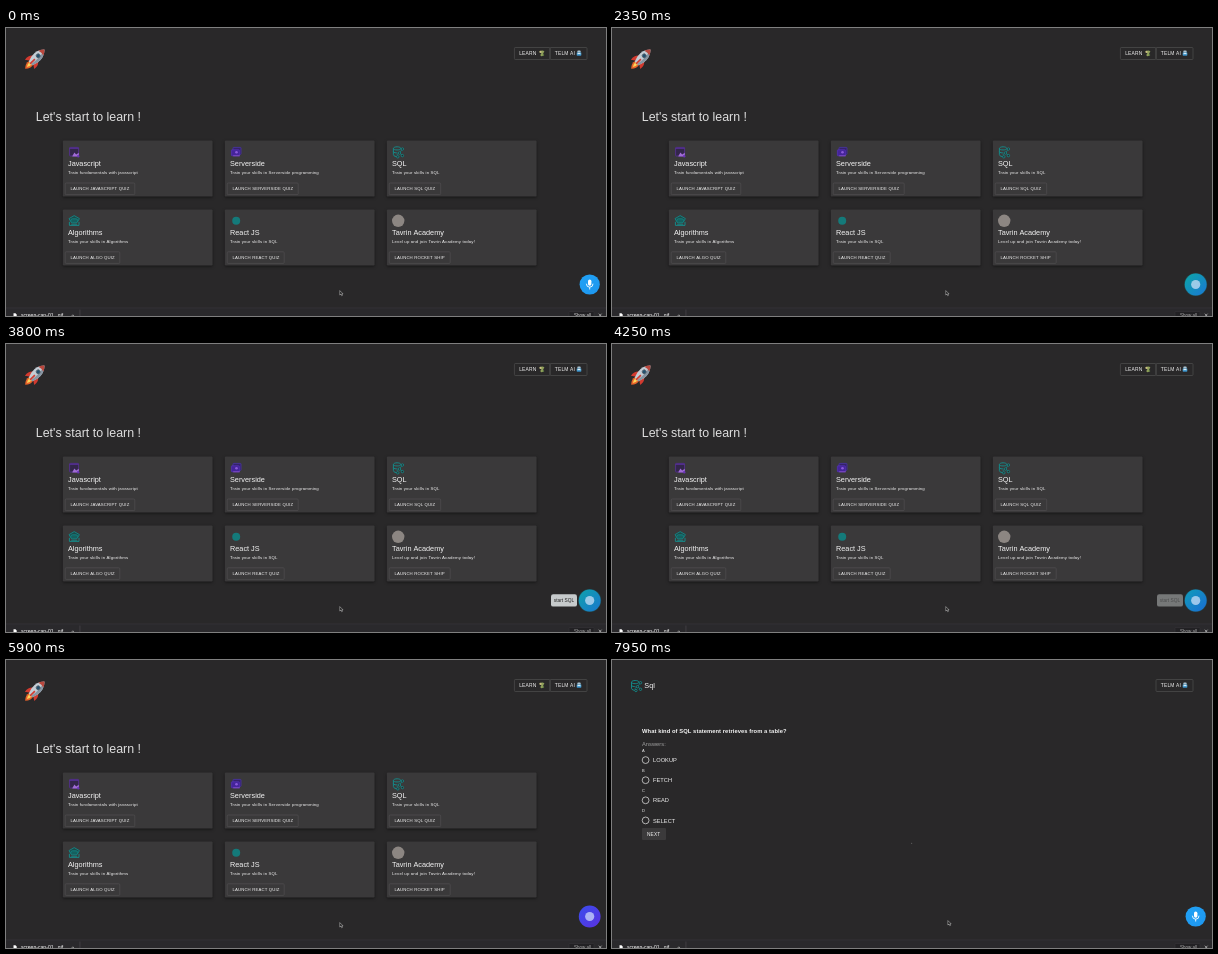
Animation, 600 px wide and 288 px high, one loop 8000 ms. Source, as an HTML page with a canvas:

```html
<!DOCTYPE html>
<html lang="en">
<head>
<meta charset="utf-8">
<title>Quiz dashboard</title>
<style>
html, body { margin: 0; width: 600px; height: 288px; overflow: hidden; background: #292829; }
canvas { display: block; width: 600px; height: 288px; }
</style>
</head>
<body>
<canvas id="stage"></canvas>
<script>
const W = 600, H = 288, LOOP = 8000;
const SANS = '"Liberation Sans", Arial, sans-serif';
const PURPLE = '#6a35b4', TEAL = '#12908f', INK = '#f4f4f4';
const canvas = document.getElementById('stage');
const ctx = canvas.getContext('2d');
const dpr = window.devicePixelRatio || 1;
canvas.width = W * dpr;
canvas.height = H * dpr;

const clamp = v => Math.max(0, Math.min(1, v));
const ramp = (t, a, b) => { const p = clamp((t - a) / (b - a)); return p * p * (3 - 2 * p); };
const mix = (a, b, p) => a + (b - a) * p;

function text(str, x, y, size, { color = INK, gap = 0, weight = 400, align = 'left' } = {}) {
  ctx.font = `${weight} ${size}px ${SANS}`;
  ctx.letterSpacing = gap + 'px';
  ctx.textAlign = align;
  ctx.fillStyle = color;
  ctx.fillText(str, x, y);
}

function box(x, y, w, h, r, fill, stroke, line = 0.6) {
  ctx.beginPath();
  ctx.roundRect(x, y, w, h, r);
  if (fill) { ctx.fillStyle = fill; ctx.fill(); }
  if (stroke) { ctx.strokeStyle = stroke; ctx.lineWidth = line; ctx.stroke(); }
}

function disc(x, y, r, fill, stroke, line = 0.7) {
  ctx.beginPath();
  ctx.arc(x, y, r, 0, Math.PI * 2);
  if (fill) { ctx.fillStyle = fill; ctx.fill(); }
  if (stroke) { ctx.strokeStyle = stroke; ctx.lineWidth = line; ctx.stroke(); }
}

function shape(d, fill, stroke, line = 0.7) {
  const p = new Path2D(d);
  if (fill) { ctx.fillStyle = fill; ctx.fill(p); }
  if (stroke) { ctx.strokeStyle = stroke; ctx.lineWidth = line; ctx.stroke(p); }
}

function at(x, y, draw, scale = 1, angle = 0) {
  ctx.save();
  ctx.translate(x, y);
  ctx.rotate(angle);
  ctx.scale(scale, scale);
  draw();
  ctx.restore();
}

// Icons, each drawn around its own centre
function codeIcon() {
  box(-4.6, -4.6, 9, 8.6, 0.6, '#33264a', '#59309a', 0.8);
  shape('M-4.6 -3.6H4.4', null, '#59309a', 0.9);
  shape('M-1.8 4L0.2 0.6L2 2.4L4.6 0.8V4.4H-1.8Z', '#a06bd6');
  disc(4, 4.2, 1.2, PURPLE);
}

function serverIcon() {
  box(-3.2, -4.6, 8, 7, 0.6, '#35226a', '#4a34a8', 0.8);
  box(-4.8, -2.2, 8, 6, 0.6, '#45249a', '#5433b4', 0.8);
  shape('M-3 3.8H3.6', null, '#8a4fd0', 0.9);
  disc(0.3, 0.3, 1.3, '#8a5ad8');
}

function sqlIcon() {
  shape('M-4.8 -3.4C-4.8 -5.8 2.6 -5.8 2.6 -3.4C2.6 -1.6 -4.8 -1.6 -4.8 -3.4V2.6C-4.8 4.2 -2 4.8 -0.6 4.6M-4.8 -0.4C-4.6 0.8 -2 1 -1 0.8', null, TEAL, 0.9);
  shape('M1.2 1L4 -2.6M1.2 1L4.2 3.2M1.2 1L-1.6 2.8', null, TEAL, 0.7);
  for (const [x, y] of [[1.2, 1], [4.2, -3], [4.2, 3.6], [-0.4, 4.8]]) disc(x, y, 1.2, '#292829', TEAL, 0.8);
}

function algoIcon() {
  shape('M-5.2 -2.2L0 -5.2L5.2 -2.2L3.6 0.6H-3.6Z', '#1c4a4a', TEAL, 0.8);
  box(-3.4, -2, 6.8, 4, 1.6, '#15605f', TEAL, 0.7);
  shape('M-4.8 1V4.6H4.8V1M-3 3.4H3', null, TEAL, 0.9);
}

function rocket() {
  shape('M-3 -0.6Q-8 2.6 -7 9.4L-2.2 6.2ZM3 -0.6Q8 2.6 7 9.4L2.2 6.2Z', '#d23a2f');
  shape('M-2.9 7.4Q-4.4 11.4 0 16Q4.4 11.4 2.9 7.4Z', '#e8632a');
  shape('M-1.5 7.4Q-2.2 10.6 0 13.4Q2.2 10.6 1.5 7.4Z', '#fbd75a');
  shape('M0 -13Q6.2 -7 4.6 2L2.8 7.8H-2.8L-4.6 2Q-6.2 -7 0 -13Z', '#c3ccd4');
  shape('M0 -13Q6.2 -7 4.6 2L2.8 7.8H0.8Q3.2 -3 0 -13Z', '#8795a2');
  shape('M0 -13Q2.6 -10.6 3.7 -7.6Q0 -9 -3.7 -7.6Q-2.6 -10.6 0 -13Z', '#b9473d');
  disc(0, -3.6, 2.1, '#24506e', '#56616b', 0.9);
  shape('M0 1.4V8.6', null, '#d23a2f', 1.7);
}

function lizard() {
  shape('M-2.6 -1.6Q0 -3.4 2.4 -2L1.2 0.4Q2.2 3 -0.6 3Q-2.6 2.4 -0.6 0Z', '#8fa05a');
  disc(-1.5, -1.3, 1.1, '#c9bd83');
  disc(1.4, 1.9, 0.8, '#5d7c45');
}

function robot() {
  box(-2.3, -1, 4.6, 3.6, 0.8, '#4d9fd0');
  box(-1.7, -2.8, 3.4, 2, 0.9, '#a9c3d2');
  shape('M-1.4 0.3H1.4', null, '#e8f3fa', 0.9);
  shape('M-1.8 2.3H1.8', null, '#2f6f9c', 0.8);
}

const cards = [
  ['Javascript', 'Train fundamentals with javascript', 'LAUNCH JAVASCRIPT QUIZ', 69.6, codeIcon],
  ['Serverside', 'Train your skills in Serverside programming', 'LAUNCH SERVERSIDE QUIZ', 71, serverIcon],
  ['SQL', 'Train your skills in SQL', 'LAUNCH SQL QUIZ', 51.5, sqlIcon],
  ['Algorithms', 'Train your skills in Algorithms', 'LAUNCH ALGO QUIZ', 54.6, algoIcon],
  ['React JS', 'Train your skills in SQL', 'LAUNCH REACT QUIZ', 57, () => disc(0, 0, 4, '#147a7a')],
  ['Tavrin Academy', 'Level up and join Tavrin Academy today!', 'LAUNCH ROCKET SHIP', 61, () => disc(0, 0, 6.2, '#8c8682')]
];

function card([title, note, label, width, icon], i) {
  const x = 56.8 + (i % 3) * 162, y = i < 3 ? 112.6 : 181.4;
  ctx.save();
  ctx.shadowColor = 'rgba(0,0,0,.5)';
  ctx.shadowBlur = 3 * dpr;
  ctx.shadowOffsetY = 1 * dpr;
  box(x, y, 149.8, 56, 1.2, '#3a393a');
  ctx.restore();
  at(x + 11.4, y + 11.4, icon);
  text(title, x + 5.2, y + 25.6, 7.3);
  text(note, x + 5.2, y + 33.8, 4.3, { gap: 0.15 });
  box(x + 2.4, y + 42.4, width, 11.6, 1, null, '#545354');
  text(label, x + 7.6, y + 49.8, 4.3, { gap: 0.13 });
}

function navButton(x, w, label, icon) {
  box(x, 19.5, w, 12, 1, null, '#575657');
  text(label, x + 4.8, 27.2, 4.9, { gap: 0.18 });
  at(x + w - 8, 25.2, icon);
}

function home() {
  at(29.8, 30.2, rocket, 0.94, Math.PI / 4);
  navButton(508.4, 35.6, 'LEARN', lizard);
  text("Let's start to learn !", 29.8, 93.2, 12.4, { gap: 0.01, color: '#dedede' });
  cards.forEach(card);
}

function quiz() {
  at(24.3, 25.7, sqlIcon);
  text('Sql', 32.3, 27.6, 7.3);
  text('What kind of SQL statement retrieves from a table?', 30, 73.4, 5.8, { weight: 700, gap: 0.07 });
  text('Answers:', 30, 86.2, 5.7, { color: '#a0a0a0', gap: 0.05 });
  ['LOOKUP', 'FETCH', 'READ', 'SELECT'].forEach((answer, i) => {
    const y = 100.1 + i * 20.1;
    text('ABCD'[i], 30, y - 8.5, 4);
    disc(33.6, y, 3.4, null, '#d5d5d5', 0.8);
    text(answer, 41, y + 2.1, 5.7, { gap: 0.03 });
  });
  box(30, 168, 24, 12, 1, '#3b3a3b');
  text('NEXT', 35, 175.7, 4.8, { gap: 0.14 });
  disc(299.7, 183.3, 0.5, '#777');
}

function downloads(t) {
  ctx.fillStyle = '#2a292c';
  ctx.fillRect(0, 280, W, 8);
  ctx.fillStyle = '#353338';
  ctx.fillRect(0, 279.6, W, 0.7);
  ctx.fillStyle = '#4a484c';
  ctx.fillRect(73.6, 281.5, 0.7, 7);
  shape('M7.5 285.2H9.5L10.7 286.6V288H7.5Z', '#fff');
  text('screen-cap-01...gif', 15, 289.2, 5.1, { color: '#fff' });
  shape('M65.5 288.2L66.8 286.8L68.1 288.2', null, '#bbb');
  box(563, 283.4, 25, 8, 1, '#222124', '#38363a');
  text('Show all', 568, 288.8, 4.5, { color: t < 1000 ? '#d6d6d6' : '#a8a8a8' });
  shape('M592.8 285.7L595.6 288.5M595.6 285.7L592.8 288.5', null, '#ccc');
}

// Voice button: time, then two gradient colours as RGB
const tints = [
  [0, [32, 160, 244], [30, 152, 240]],
  [50, [32, 160, 244], [30, 152, 240]],
  [350, [0, 112, 250], [12, 96, 246]],
  [1500, [0, 108, 246], [14, 98, 246]],
  [2100, [14, 160, 172], [26, 128, 204]],
  [3000, [18, 150, 190], [16, 124, 204]],
  [3800, [16, 154, 178], [24, 126, 200]],
  [4250, [18, 148, 190], [24, 116, 206]],
  [4550, [94, 60, 226], [64, 70, 232]],
  [5300, [62, 76, 236], [88, 56, 224]],
  [5950, [64, 72, 234], [84, 54, 226]],
  [7500, [64, 72, 234], [84, 54, 226]],
  [7750, [32, 160, 244], [30, 152, 240]],
  [8000, [32, 160, 244], [30, 152, 240]]
];

function tint(t) {
  const i = Math.max(1, tints.findIndex(k => k[0] > t));
  const a = tints[i - 1], b = tints[i], p = ramp(t, a[0], b[0]);
  return [1, 2].map(n => `rgb(${a[n].map((v, c) => Math.round(mix(v, b[n][c], p)))})`);
}

function mic() {
  box(-1.7, -5, 3.4, 6.2, 1.7, '#fff');
  shape('M-3.3 -0.8Q-3.3 2.7 0 2.7Q3.3 2.7 3.3 -0.8M0 2.7V5', null, '#fff', 0.9);
}

function voiceButton(t) {
  const live = ramp(t, 50, 350) * (1 - ramp(t, 7500, 7750));
  const listen = ramp(t, 1900, 2300) * (1 - ramp(t, 4200, 4450));
  const [a, b] = tint(t);
  const r = mix(10.1, 10.9, live);
  at(583.7, 256.5, () => {
    if (listen > 0) {
      ctx.globalAlpha = 0.3 * listen;
      disc(0, 0, r + 0.6, a);
      ctx.globalAlpha = 1;
    }
    const g = ctx.createLinearGradient(-7, -7, 7, 7);
    g.addColorStop(0, a);
    g.addColorStop(1, b);
    disc(0, 0, r, g);
    ctx.globalAlpha = 1 - live;
    mic();
    ctx.globalAlpha = live * 0.7;
    disc(0, 0, 4.6, '#d5e4fb');
    ctx.globalAlpha = 1;
  });
}

function bubble(t) {
  const show = ramp(t, 2400, 2800) * (1 - ramp(t, 4150, 4350));
  if (!show) return;
  const full = t >= 3150, w = full ? 26 : 16;
  ctx.globalAlpha = show;
  box(571 - w, 250.2, w, 12.4, 2.2, '#c6cacb');
  text(full ? 'start SQL' : 'start', 571 - w / 2, 258.3, 4.8, { color: '#222', align: 'center' });
  ctx.globalAlpha = 1;
}

function cursor(t) {
  const p = ramp(t, 7450, 7750);
  at(mix(333.8, 335.9, p), mix(262.6, 260.6, p), () =>
    shape('M0 0V4.4L1.1 3.5L1.9 5.1L2.6 4.7L1.9 3.2H3.2Z', '#111', '#d8d8d8', 0.5));
}

function frame(now) {
  const t = now % LOOP;
  ctx.setTransform(dpr, 0, 0, dpr, 0, 0);
  ctx.fillStyle = '#292829';
  ctx.fillRect(0, 0, W, H);
  (t < 6400 ? home : quiz)();
  navButton(544, 37, 'TELM AI', robot);
  downloads(t);
  bubble(t);
  voiceButton(t);
  cursor(t);
  requestAnimationFrame(frame);
}
requestAnimationFrame(frame);
</script>
</body>
</html>
```
